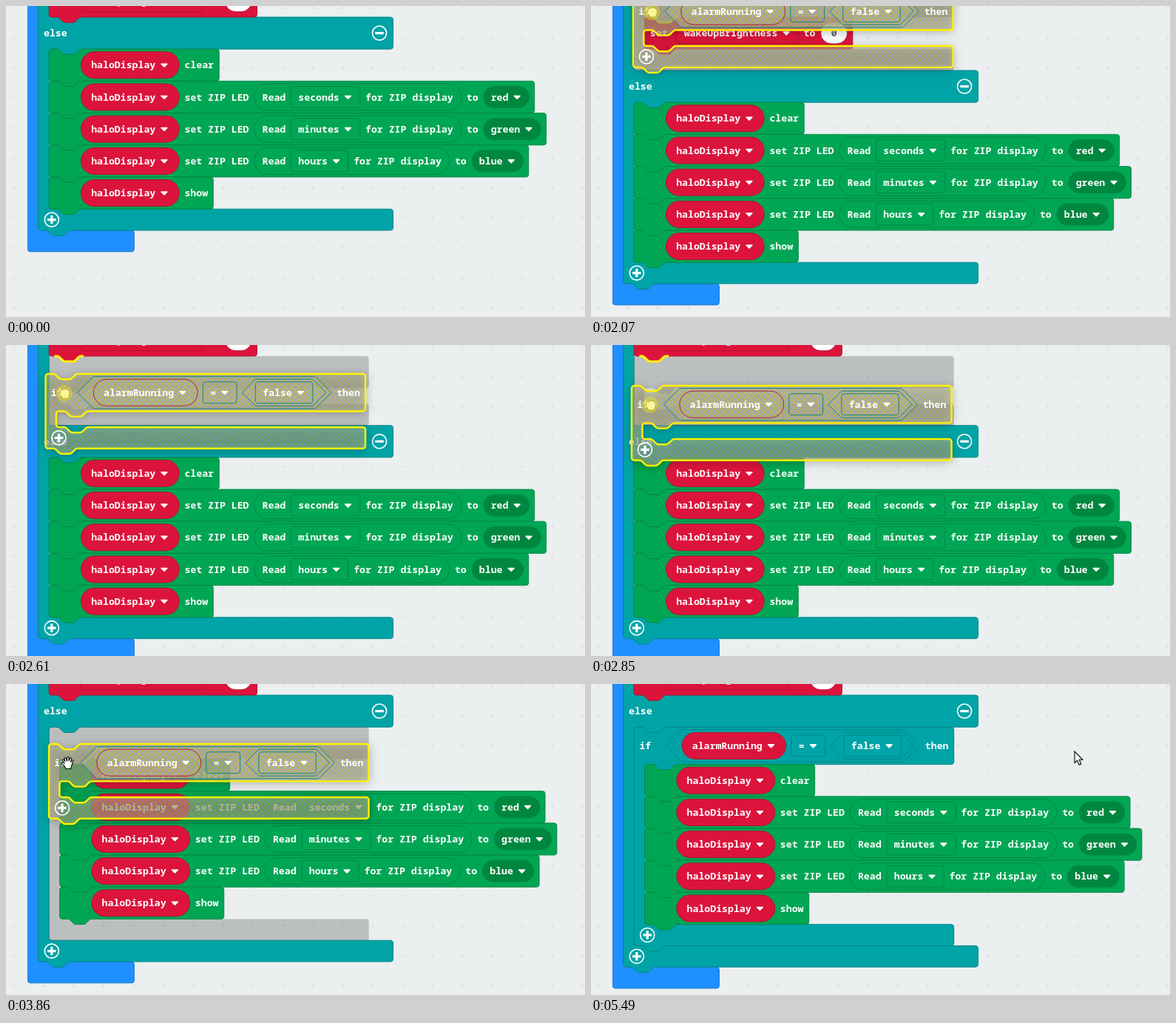
Recreate the animation shown at these times as an HTML page with a canvas. Size 783 px wide and 420 px high, loop 6500 ms.

```html
<!DOCTYPE html>
<html lang="en">
<head>
<meta charset="utf-8">
<title>Block editor: wrapping blocks with an if</title>
<style>
html, body { margin: 0; width: 100%; height: 100%; overflow: hidden; background: #ebeff0; }
canvas { display: block; }
</style>
</head>
<body>
<canvas id="stage" width="783" height="420"></canvas>
<script>
const ctx = document.getElementById('stage').getContext('2d');
const LOOP = 6500, ZOOM = 0.9, CHAR = 8.8, STEP = 77.1;
const ROW = 48, HEAD = 56, BAR = 32, GAP = 24, INDENT = 16;
const YELLOW = '#fff200';
const GREEN = { fill: '#00a654', line: '#008543', dark: '#00873f' };
const RED = { fill: '#dc143c', line: '#b01030' };
const TEAL = { fill: '#00a4a6', line: '#008385' };
const BLUE = { fill: '#1e90ff', line: '#1873cc' };

// Connector outlines, drawn rightwards and leftwards.
const DIP_R = 'c2 0 3 1 4 2l4 4c1 1 2 2 4 2h12c2 0 3-1 4-2l4-4c1-1 2-2 4-2';
const DIP_L = 'c-2 0-3 1-4 2l-4 4c-1 1-2 2-4 2h-12c-2 0-3-1-4-2l-4-4c-1-1-2-2-4-2';

const hatch = (() => {
  const tile = document.createElement('canvas');
  tile.width = tile.height = 10;
  const c = tile.getContext('2d');
  c.fillStyle = '#aaa';
  c.fillRect(0, 0, 10, 10);
  c.strokeStyle = '#cc0';
  c.stroke(new Path2D('M0 0L10 10M10 0L0 10'));
  return ctx.createPattern(tile, 'repeat');
})();

const halo = ['var', 'haloDisplay'];
const setLed = (unit, color) => [halo, ['label', 'set ZIP LED'],
  ['read', [['label', 'Read'], ['drop', unit], ['label', 'for ZIP display']]],
  ['label', 'to'], ['color', color]];
const ROWS = [
  [halo, ['label', 'clear']],
  setLed('seconds', 'red'),
  setLed('minutes', 'green'),
  setLed('hours', 'blue'),
  [halo, ['label', 'show']]
];
const SET_ITEMS = [['drop', 'wakeUpBrightness'], ['label', 'to'], ['num', '0']];
const IF_ITEMS = [
  ['compare', [['var', 'alarmRunning'], ['drop', '='], ['hex', [['drop', 'false']]]]],
  ['label', 'then']
];
const STACK = ROW * ROWS.length;

const PAD = { label: [0, 0], drop: [11, 31.1], color: [11, 31.1], var: [15.3, 35.5],
  num: [15.6, 15.6], read: [12, 12], hex: [20, 20], compare: [24, 8] };

const rowWidth = items => items.reduce((w, it) => w + itemWidth(it), 8 * (items.length - 1));
function itemWidth([kind, v]) {
  const inner = typeof v === 'string' ? v.length * CHAR : rowWidth(v);
  return PAD[kind][0] + inner + PAD[kind][1];
}
const blockWidth = items => 48 + rowWidth(items) + 8;
const IF_WIDTH = blockWidth(IF_ITEMS);

// parts alternates head, mouth, head, mouth ... and ends with the foot.
function blockPath(w, parts, { empty = false, tab = true } = {}) {
  let y = 0, d = `M0 4a4 4 0 0 1 4-4h8${DIP_R}H${w - 4}a4 4 0 0 1 4 4`;
  for (let i = 0; i < parts.length; i += 2) {
    y += parts[i];
    d += `V${y - 4}a4 4 0 0 1-4 4`;
    if (i + 1 < parts.length) {
      d += `H64${DIP_L}h-8a4 4 0 0 0-4 4`;
      y += parts[i + 1];
      d += `V${y - 4}a4 4 0 0 0 4 4h8${empty ? DIP_R : ''}H${w - 4}a4 4 0 0 1 4 4`;
    }
  }
  return new Path2D(d + `H48${tab ? DIP_L : ''}H4a4 4 0 0 1-4-4z`);
}

function at(x, y, draw) {
  ctx.save();
  ctx.translate(x, y);
  draw();
  ctx.restore();
}

// The hatch is see-through, so stacked shapes grow denser.
function paint(path, fill, line, width = 1) {
  if (fill) {
    ctx.globalAlpha = fill === hatch ? 0.6 : 1;
    ctx.fillStyle = fill;
    ctx.fill(path);
    ctx.globalAlpha = 1;
  }
  if (!line) return;
  ctx.strokeStyle = line;
  ctx.lineWidth = width;
  ctx.stroke(path);
}

function text(s, x, mid, color = '#fff') {
  ctx.font = 'bold 14.667px "Noto Sans Mono", "DejaVu Sans Mono", monospace';
  ctx.fillStyle = color;
  ctx.fillText(s, x, mid + 5.2);
}

function arrow(x, mid) {
  const p = new Path2D(`M${x - 4.4} ${mid - 1.8}h8.8l-4.4 4.4z`);
  ctx.lineJoin = 'round';
  paint(p, '#fff', '#fff', 1.6);
}

function box(x, mid, w, h, r) {
  const p = new Path2D();
  p.roundRect(x, mid - h / 2, w, h, r);
  return p;
}

function hexagon(x, mid, w, h) {
  const r = h / 2;
  return new Path2D(`M${x} ${mid}l${r} ${-r}H${x + w - r}l${r} ${r}l${-r} ${r}H${x + r}z`);
}

function drawItems(items, x, mid, pal, ghost) {
  for (const item of items) {
    const [kind, v] = item, w = itemWidth(item), tx = x + PAD[kind][0];
    const skin = c => ghost ? hatch : c;
    if (kind === 'drop') paint(box(x, mid, w, 32, 4), null, pal.line);
    if (kind === 'var') paint(box(x, mid, w, 40, 20), skin(RED.fill), RED.line);
    if (kind === 'color') paint(box(x, mid, w, 32, 16), pal.dark, pal.line);
    if (kind === 'num') paint(box(x, mid, w, 32, 16), '#fff', pal.line);
    if (kind === 'read') paint(box(x, mid, w, 40, 20), null, pal.line);
    if (kind === 'hex') paint(hexagon(x, mid, w, 40), skin(pal.fill), pal.line);
    if (kind === 'compare') paint(hexagon(x, mid, w, 48), skin(pal.fill), pal.line);
    if (typeof v === 'string') {
      text(v, tx, mid, kind === 'num' ? '#575e75' : '#fff');
      if (['drop', 'var', 'color'].includes(kind)) arrow(tx + v.length * CHAR + 13, mid);
    } else {
      drawItems(v, tx, mid, pal, ghost);
    }
    x += w + 8;
  }
}

function sign(x, y, plus) {
  ctx.strokeStyle = '#fff';
  ctx.lineWidth = 1.8;
  ctx.beginPath();
  ctx.arc(x, y, 10.6, 0, 7);
  ctx.stroke();
  ctx.lineWidth = 3.6;
  ctx.stroke(new Path2D(`M${x - 6.4} ${y}h12.8` + (plus ? `M${x} ${y - 6.4}v12.8` : '')));
}

function statement(x, y, items, pal, lead) {
  at(x, y, () => {
    paint(blockPath(blockWidth(items), [ROW]), pal.fill, pal.line);
    if (lead) text(lead, 8, ROW / 2);
    drawItems(items, 48, ROW / 2, pal);
  });
}

function ifBlock(mouth, { ghost = false, selected = false, lifted = false } = {}) {
  const path = blockPath(IF_WIDTH, [HEAD, mouth, BAR], { empty: mouth === GAP });
  ctx.save();
  if (lifted) {
    ctx.shadowColor = 'rgba(0,0,0,.5)';
    ctx.shadowBlur = 14;
    ctx.shadowOffsetY = 2;
  }
  paint(path, ghost ? hatch : TEAL.fill);
  ctx.restore();
  paint(path, null, selected ? YELLOW : TEAL.line, selected ? 2.7 : 1);
  text('if', 8, HEAD / 2);
  drawItems(IF_ITEMS, 48, HEAD / 2, TEAL, ghost);
  sign(20, HEAD + mouth + BAR / 2, true);
}

function marker(x, y, mouth) {
  at(x, y, () => paint(
    blockPath(IF_WIDTH, [ROW, mouth, BAR], { empty: mouth === GAP, tab: false }),
    'rgba(0,0,0,.2)'));
}

function joint(x, y) {
  at(x, y, () => paint(new Path2D('M8 0h4' + DIP_R + 'h4'), null, YELLOW, 3.4));
}

// Where the if block would land (or has landed) at time t.
function phase(t) {
  if (t < 1850) return 'none';
  if (t < 2610) return 'aroundSet';
  if (t < 3080) return 'afterSet';
  if (t < 3930) return 'aroundRows';
  return 'placed';
}

function program(t) {
  const p = phase(t);
  const elseY = { aroundSet: ROW + BAR, afterSet: ROW + GAP + BAR }[p] || 0;
  const head = { aroundRows: ROW, placed: HEAD }[p] || 0;
  const mouth = STACK + (head && head + BAR);
  const footY = elseY + ROW + mouth;
  const far = 400;

  at(0, -far, () => paint(
    blockPath(160, [40, far + footY + BAR - 40, BAR], { tab: false }), BLUE.fill, BLUE.line));
  at(INDENT, -far, () => paint(
    blockPath(533, [40, far + elseY - 40, ROW, mouth, BAR]), TEAL.fill, TEAL.line));
  text('else', INDENT + 8, elseY + ROW / 2);
  sign(528.5, elseY + ROW / 2, false);
  sign(36, footY + BAR / 2, true);

  if (p === 'aroundSet') marker(32, -ROW, ROW);
  if (p === 'afterSet') marker(32, 0, GAP);
  if (p === 'aroundRows') marker(32, ROW, STACK);
  if (p === 'placed') at(32, ROW, () => ifBlock(STACK, { ghost: t < 4010, selected: t < 5420 }));

  const wrapped = p === 'aroundSet';
  statement(wrapped ? 48 : 32, wrapped ? 0 : -ROW, SET_ITEMS, RED, 'set');
  ROWS.forEach((items, i) =>
    statement(head ? 48 : 32, elseY + ROW + head + i * ROW, items, GREEN));

  if (wrapped) joint(48, 0);
  if (p === 'afterSet') joint(32, 0);
  if (p === 'aroundRows' && t < 3310) joint(48, 2 * ROW);
}

// Keys are [time, x, y] in stage pixels.
const DRAG = [[1530, 145, -104], [1770, 98, -58], [2069, 57, -18], [2150, 54, -12],
  [2220, 54, -9], [2378, 52, 23], [2840, 55, 55], [2930, 55, 55], [3300, 58, 81]];
const POINTER = [[4573, 83, 107], [4880, 270, 136], [5080, 470, 126], [5230, 645, 94],
  [5330, 650, 92], [5460, 654, 91]];

function along(keys, t) {
  if (t <= keys[0][0]) return keys[0].slice(1);
  for (let i = 1; i < keys.length; i++) {
    const [t0, x0, y0] = keys[i - 1], [t1, x1, y1] = keys[i];
    if (t < t1) {
      const k = (t - t0) / (t1 - t0);
      return [x0 + (x1 - x0) * k, y0 + (y1 - y0) * k];
    }
  }
  return keys[keys.length - 1].slice(1);
}

function hand(x, y, closed) {
  const fingers = closed
    ? 'M-5 -1c-1-4 2-5 3-3c0-3 3-3 3.5-1c1-2 3.5-1 3.5 1c1-1 2.5 0 2.5 2v3c0 3-2 3-2 6h-8c0-3-4-4-4-7c0-1 1-2 1.5-1z'
    : 'M-4 1l-2-4c-1-2 1-3 2-1l1 2l-1-4c0-2 2-2 2.5 0l1 3v-4c0-2 2.5-2 2.5 0v4l1-3c.5-2 2.5-1 2.3.5l-.6 4l1-2c1-1.5 2.5-.5 2 1l-2 6c-.5 2-1 2-1 4h-7c0-3-3-4-5-7c-1-2 1-3 2.3-1.5z';
  at(x, y, () => {
    ctx.lineJoin = 'round';
    paint(new Path2D(fingers), '#fff', closed ? '#8a8550' : '#000', 1.1);
    if (closed) {
      ctx.fillStyle = 'rgba(242,232,12,.42)';
      ctx.beginPath();
      ctx.arc(0, 0, 11, 0, 7);
      ctx.fill();
    }
  });
}

function pointer(x, y) {
  at(x, y, () => {
    ctx.lineJoin = 'miter';
    paint(new Path2D('M0 0V15.5L3.6 12.2L6.2 18.3L8.8 17.2L6.3 11.3H11z'), '#fff', '#000', 1.1);
  });
}

function grid() {
  ctx.strokeStyle = '#dce0e1';
  ctx.lineWidth = 1;
  ctx.beginPath();
  for (let x = 10; x < 783; x += 40.5) {
    for (let y = 2.5; y < 420; y += 40.5) {
      ctx.moveTo(x - 2.5, y); ctx.lineTo(x + 2.5, y);
      ctx.moveTo(x, y - 2.5); ctx.lineTo(x, y + 2.5);
    }
  }
  ctx.stroke();
}

function draw(t) {
  ctx.setTransform(1, 0, 0, 1, 0, 0);
  ctx.fillStyle = '#ebeff0';
  ctx.fillRect(0, 0, 783, 420);
  grid();
  ctx.setTransform(ZOOM, 0, 0, ZOOM, 29.4, 15);
  program(t);

  ctx.setTransform(1, 0, 0, 1, 0, 0);
  if (t < 1530) return;
  const tick = t - (t - 1530) % STEP;
  if (t < 3930) {
    const [x, y] = along(DRAG, tick);
    at(x, y, () => {
      ctx.scale(ZOOM, ZOOM);
      ifBlock(GAP, { ghost: true, selected: true, lifted: true });
    });
    hand(x + 25, y + 26, t < 3860);
  } else {
    const [x, y] = along(POINTER, tick);
    if (x < 490) hand(x, y, false);
    else pointer(x, y);
  }
}

const start = performance.now();
function frame() {
  draw((performance.now() - start) % LOOP);
  requestAnimationFrame(frame);
}
frame();
</script>
</body>
</html>
```
